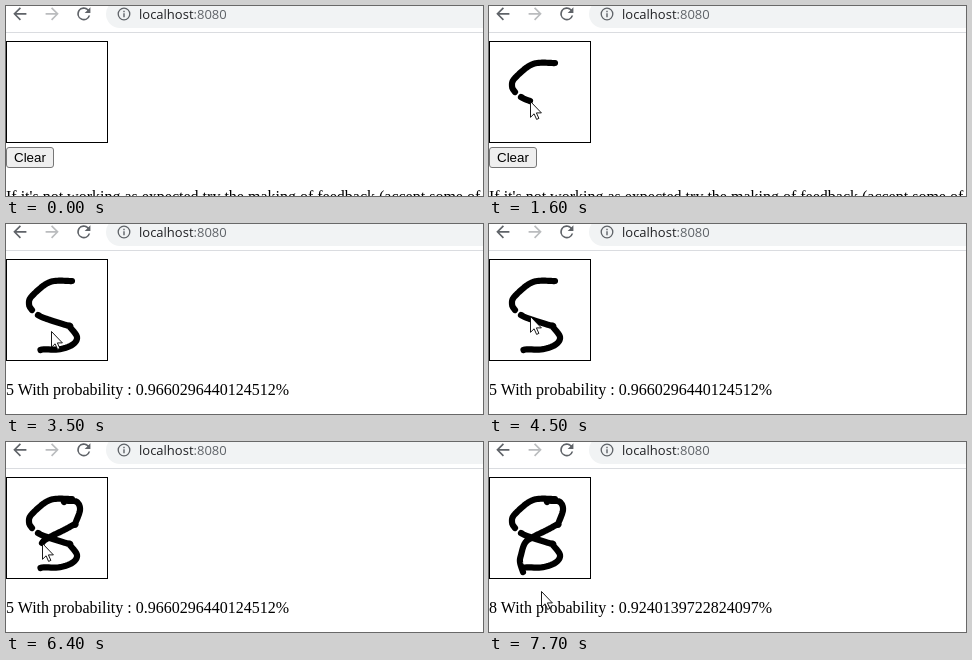
An HTML page that plays this animation: 477x190 px, repeating every 8000 ms.

```html
<!DOCTYPE html>
<html lang="en">
<head>
<meta charset="utf-8">
<title>Digit recogniser</title>
<style>
  html, body { margin: 0; width: 100%; height: 100%; overflow: hidden; background: #fff; }
  svg { display: block; }
  .url { font: 13px "Open Sans", sans-serif; fill: #202124; }
  .page { font: 16px "Liberation Serif", serif; }
  .label { font: 13.333px "Liberation Sans", sans-serif; }
  .icon { fill: #5f6368; }
</style>
</head>
<body>
<svg width="477" height="190" viewBox="0 0 477 190">
  <!-- browser bar -->
  <rect y="26" width="477" height="1" fill="#dadce0"/>
  <rect x="100" y="-6" width="400" height="28" rx="14" fill="#f1f3f4"/>
  <path class="icon" transform="translate(4 -2) scale(.82)" d="M20 11H7.83l5.59-5.59L12 4l-8 8 8 8 1.41-1.41L7.83 13H20z"/>
  <path transform="translate(56 -2) scale(-.82 .82)" fill="#babcbe" d="M20 11H7.83l5.59-5.59L12 4l-8 8 8 8 1.41-1.41L7.83 13H20z"/>
  <path class="icon" transform="translate(68 -2) scale(.82)" d="M17.65 6.35A8 8 0 1 0 19.73 14h-2.08A6 6 0 1 1 12 6c1.66 0 3.14.69 4.22 1.78L13 11h7V4z"/>
  <circle cx="118" cy="8" r="5.8" fill="none" stroke="#5f6368" stroke-width="1.3"/>
  <path class="icon" d="M117.3 4.8h1.4v1.4h-1.4zM117.3 7.3h1.4v4h-1.4z"/>
  <text class="url" x="133" y="13">localhost<tspan fill="#5f6368">:8080</tspan></text>

  <!-- page -->
  <rect x=".5" y="35.5" width="101" height="101" fill="#fff" stroke="#000"/>
  <g id="form">
    <rect x=".5" y="141.5" width="47" height="20" rx="2.5" fill="#efefef" stroke="#767676"/>
    <text class="label" x="8" y="156">Clear</text>
    <text class="page" y="196">If it's not working as expected try the making of feedback (accept some of</text>
  </g>
  <text id="result" class="page" y="171"></text>
  <path id="ink" fill="none" stroke="#000" stroke-width="6.2" stroke-linecap="round" stroke-linejoin="round"/>
  <path id="cursor" d="M.5 .5V16.3L4.1 12.8L6.6 18.4L8.9 17.4L6.4 11.9H11.4Z" fill="#fff" stroke="#000" stroke-width=".9"/>
</svg>
<script>
const STEP = 100, LOOP = 8000;
const $ = id => document.getElementById(id);

// Pointer knots: [step, x, y]
const knots = [
  [1, 20, 2], [4, 38, 28], [8, 65, 56],
  [9, 66, 57], [11, 44, 58], [13, 26, 72], [14, 23, 80], [14.5, 26, 86],
  [15, 32, 91], [16, 41, 95], [18, 63, 102], [19, 63, 102],
  [21, 71, 113], [22, 66, 121], [23, 52, 125.5], [24, 34.5, 126],
  [26, 32, 136], [29, 34, 170], [33, 44, 140], [35, 45, 107], [36, 45, 107],
  [40, 41, 99], [41, 41, 99], [42, 40, 98], [43, 40, 98], [48, 45, 80],
  [52, 58, 60], [53, 63, 59], [54, 71, 60], [55, 74, 68], [57, 69, 82], [58, 69, 82],
  [60, 58, 88], [62, 44, 95], [64, 36, 101], [66, 32, 113], [67, 31, 120], [69, 34, 130],
  [71, 39, 144], [73, 44, 153], [74, 44, 153], [77, 52, 149], [80, 52, 149]
];
const strokes = [[9, 14.5], [15, 24], [52, 69]];
const results = [
  [71, "8 With probability : 0.9240139722824097%"],
  [26, "5 With probability : 0.9660296440124512%"]
];

function spline(a, b, c, d, u) {
  return b + u * (c - a + u * (2 * a - 5 * b + 4 * c - d + u * (3 * (b - c) + d - a))) / 2;
}

function pointAt(s) {
  const last = knots.length - 1;
  let i = 0;
  while (i < last - 1 && knots[i + 1][0] <= s) i++;
  const near = [i - 1, i, i + 1, i + 2].map(k => knots[Math.min(last, Math.max(0, k))]);
  const u = (s - near[1][0]) / (near[2][0] - near[1][0]);
  return [1, 2].map(axis => spline(...near.map(k => k[axis]), u));
}

function inkPath(step) {
  let d = "";
  for (const [from, to] of strokes) {
    if (step < from) break;
    const end = Math.min(to, step);
    d += "M" + pointAt(from);
    for (let s = from; s <= end; s += 0.125) d += "L" + pointAt(s);
  }
  return d;
}

function draw(step) {
  const result = results.find(([at]) => step >= at);
  $("form").style.display = result ? "none" : "";
  $("result").textContent = result ? result[1] : "";
  $("ink").setAttribute("d", inkPath(step));
  const [x, y] = pointAt(Math.max(1, step)).map(Math.round);
  $("cursor").setAttribute("transform", `translate(${x} ${y})`);
  $("cursor").style.display = step < 1 ? "none" : "";
}

let shown = -1;
const start = performance.now();
function tick() {
  const step = Math.floor((performance.now() - start) % LOOP / STEP);
  if (step !== shown) draw(shown = step);
  requestAnimationFrame(tick);
}
tick();
</script>
</body>
</html>
```
